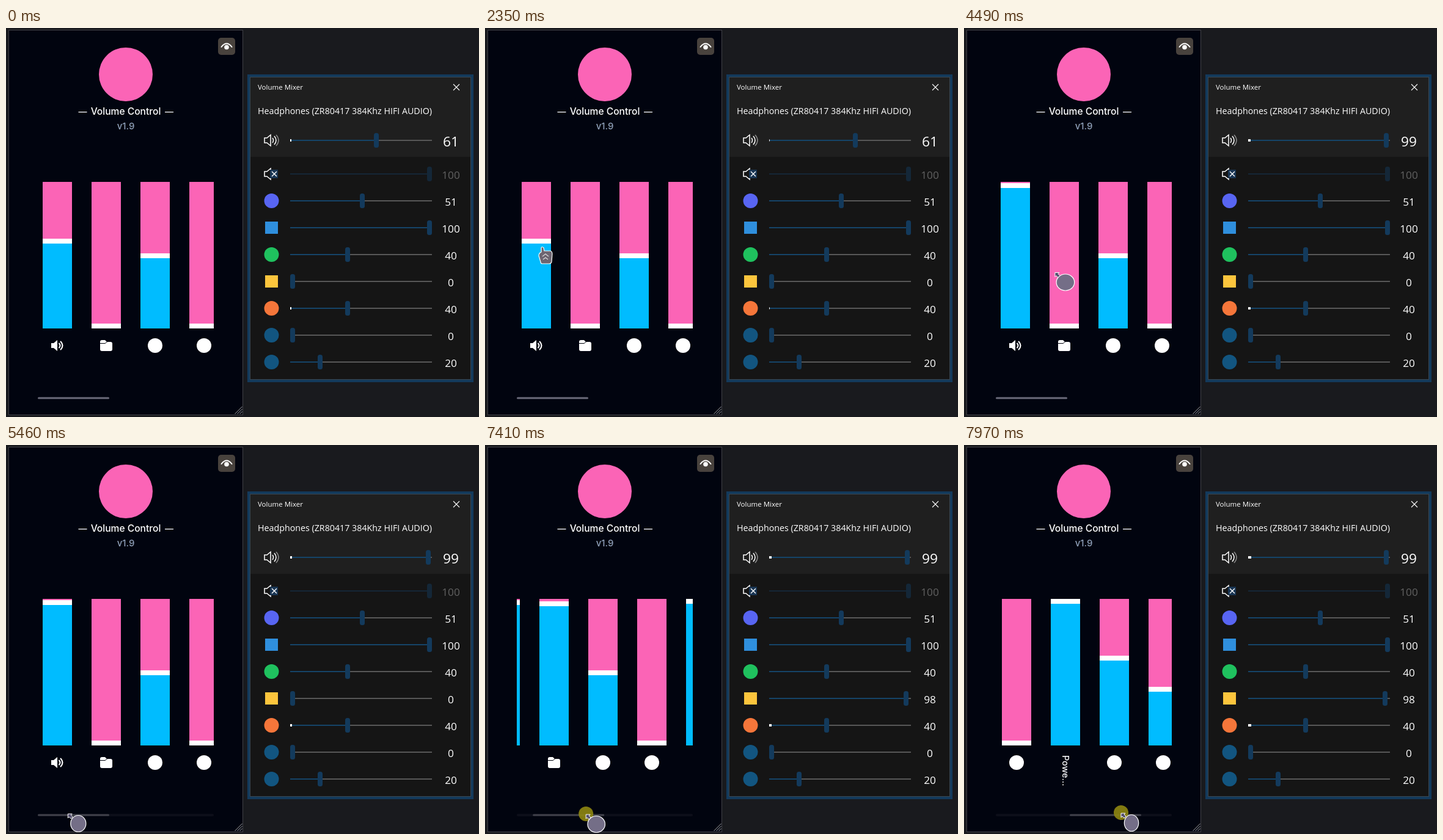
An HTML page that plays this animation: 774 by 637 pixels, repeating every 8000 ms.

```html
<!DOCTYPE html>
<html lang="en">
<head>
<meta charset="utf-8">
<title>Volume Control</title>
<style>
  html, body { margin: 0; width: 100%; height: 100%; overflow: hidden; background: #191a1e; }
  svg { display: block; width: 774px; height: 637px; }
  .app { font-family: Inter, "DejaVu Sans", sans-serif; font-weight: 500; fill: #fff; }
  .mixer { font-family: "Open Sans", "Noto Sans", sans-serif; fill: #fff; }
  .mid { text-anchor: middle; }
</style>
</head>
<body>
<svg viewBox="0 0 774 637" xmlns="http://www.w3.org/2000/svg">
  <defs>
    <clipPath id="view"><rect x="52" y="240" width="288" height="340"/></clipPath>
    <clipPath id="panel"><rect x="5" y="4" width="382" height="633"/></clipPath>
  </defs>
  <rect width="774" height="637" fill="#191a1e"/>

  <rect x="4.500" y="3.500" width="383" height="630" fill="#01040f" stroke="#414146"/>
  <circle cx="196" cy="76" r="44" fill="#fb64b6"/>
  <g class="app mid">
    <text x="125.500" y="142" font-size="14">—</text>
    <text x="196" y="142" font-size="15.600">Volume Control</text>
    <text x="267" y="142" font-size="14">—</text>
    <text x="196" y="166" font-size="15" fill="#90a1b9">v1.9</text>
  </g>
  <rect x="347" y="16" width="28" height="28" rx="5" fill="#48423d"/>
  <path d="M352.500 31q8.500-11 17 0" fill="none" stroke="#fff" stroke-width="2" stroke-linecap="round"/>
  <circle cx="361" cy="31.500" r="3.800" fill="#fff"/>
  <path d="M374.500 632l12-12m-8 12l8-8m-4 8l4-4" stroke="#aaa" fill="none"/>

  <g clip-path="url(#view)"><g id="bars"></g></g>
  <rect id="rail" x="52" y="604" width="288" height="4" rx="2" fill="#0c0e19"/>
  <rect id="grip" y="604.500" width="117" height="3" rx="1.500"/>

  <rect x="397" y="78" width="366" height="500" fill="#151515" stroke="#133a5c" stroke-width="4"/>
  <rect x="399" y="80" width="362" height="131" fill="#1f1f1f"/>
  <rect x="399.500" y="80.500" width="361" height="495" fill="none" stroke="#3a4650"/>
  <path d="M732 92l10 10m0-10l-10 10" stroke="#fff" stroke-width="1.100"/>
  <g class="mixer">
    <text x="412" y="101" font-size="11.500">Volume Mixer</text>
    <text x="412" y="141" font-size="14.260">Headphones (ZR80417 384Khz HIFI AUDIO)</text>
  </g>
  <g id="rows"></g>

  <g clip-path="url(#panel)"><g id="cursor">
    <circle id="press" cy="-1" r="12" fill="#8c8411" fill-opacity=".92"/>
    <g id="pointer">
      <ellipse id="body" cx="17" cy="16" fill="#746e87" stroke="#fff" stroke-width="1.200"/>
      <path d="M0 0h7l-2 2 3 3-3 3-3-3-2 2z" fill="#55506e" stroke="#fff"/>
    </g>
    <g id="hand">
      <path d="M0 2q1-3 4 0l1 5h10q3 1 3 5l-1 13q-1 3-4 3H2q-3 0-3-3l-3-10q0-3 2-5l2-1z" fill="#6e6571" stroke="#fff" stroke-width="1.200"/>
      <path d="M2 16l5-4 5 4M3 21l4-3 4 3" fill="none" stroke="#ddd" stroke-width="1.200"/>
    </g>
  </g></g>
</svg>
<script>
const LOOP = 8000;
const $ = id => document.getElementById(id);
const set = (el, attrs) => { for (const k in attrs) el.setAttribute(k, attrs[k]); };
const show = (el, on) => set(el, { visibility: on ? 'visible' : 'hidden' });
const within = (t, a, b) => t >= a && t < b;

// Linear track through [time, value...] keys.
function track(keys, t, col = 1) {
  if (t <= keys[0][0]) return keys[0][col];
  for (let i = 1; i < keys.length; i++) {
    const a = keys[i - 1], b = keys[i];
    if (t < b[0]) return a[col] + (b[col] - a[col]) * (t - a[0]) / (b[0] - a[0]);
  }
  return keys[keys.length - 1][col];
}

const path = [
  [70, 170, 640], [400, 110, 560], [600, 66, 480], [820, 150, 440], [960, 202, 432],
  [1120, 229, 455], [1300, 172, 530], [1500, 64, 450], [1650, 98, 412], [2000, 100, 370],
  [2350, 92, 358], [2540, 92, 350], [3300, 84, 254], [3450, 80, 260], [4140, 78, 418],
  [4300, 92, 415], [4490, 149, 400], [4900, 120, 604], [5500, 100, 604], [5800, 140, 560],
  [5930, 150, 488], [6150, 146, 258], [6290, 144, 407], [6640, 134, 570], [6900, 139, 605],
  [7410, 165, 605], [7970, 257, 603]
];
const slide = [[6930, 0], [7410, 26], [7970, 121]];
const masterKeys = [[2560, 61], [3300, 100], [4209, 100], [4210, 99]];
const folderKeys = [[5930, 0], [6150, 98]];
const level = [
  [0, 1.5], [300, 2.5], [500, 1], [960, 1], [1300, 2], [1700, 1], [2150, 3], [2350, 1],
  [3000, 2], [4300, 1], [4490, 4], [4700, 1], [5500, 3], [6000, 1], [6290, 1],
  [6900, 8], [7100, 2], [7410, 4], [7700, 2], [7970, 5]
];

// Strips on the left.
const disc = '<circle cx="24" cy="520" r="12" fill="#fff"/>';
const icons = [
  '<path d="M14 516h4l6-5v18l-6-5h-4z" fill="#fff"/><path d="M27 516.500q3 3.500 0 7m2.500-10q6 6.500 0 13" fill="none" stroke="#fff" stroke-width="2" stroke-linecap="round"/>',
  '<path d="M14 514q0-3 3-3h5l3 3h0l-3 2h-8zM14 517h8l4-3h5q3 0 3 3v9q0 3-3 3H17q-3 0-3-3z" fill="#fff"/>',
  disc, disc,
  '<text class="app" transform="translate(19 508) rotate(90)" font-size="14.300">Powe...</text>',
  disc, disc, disc
];
const volumes = [61, 0, 51, 0, 100, 61, 40, 0];
$('bars').innerHTML = icons.map((icon, i) =>
  `<g transform="translate(${60 + 80 * i} 0)">
    <rect y="252" width="48" height="240" fill="#fb64b6"/>
    <rect class="fill" width="48" fill="#00bcff"/>
    <rect class="knob" width="48" height="8" fill="#fff"/>${icon}</g>`).join('');

function setBar(i, v) {
  const g = $('bars').children[i];
  const y = Math.round(Math.min(484, 491.6 - 2.4 * v));
  set(g.querySelector('.knob'), { y });
  set(g.querySelector('.fill'), { y: y + 8, height: 484 - y });
}

// Mixer rows on the right.
const speaker = '<path d="M423 -4h4l6-5v18l-6-5h-4z" fill="none" stroke="#fff" stroke-width="1.500"/>';
const dot = color => `<circle cx="434.500" r="12" fill="${color}"/>`;
const square = color => `<rect x="424" y="-10" width="21" height="20" fill="${color}"/>`;
const rows = [
  [184, 61, speaker + '<path d="M436 -4q3 4 0 8m3-11q6 7 0 14" fill="none" stroke="#fff" stroke-width="1.500"/><path d="M442 -9q8 9 0 18" fill="none" stroke="#888" stroke-width="1.500"/>'],
  [239, 100, speaker + '<rect x="432" y="-7" width="13" height="14" fill="#193553"/><path d="M435 -4l8 8m0-8l-8 8" stroke="#fff" stroke-width="1.400"/>'],
  [283, 51, dot('#5865f2')],
  [327, 100, square('#2f8fdd')],
  [371, 40, dot('#1fc15e')],
  [415, 0, square('#fcc53d')],
  [459, 40, dot('#f5763a')],
  [503, 0, dot('#125580')],
  [547, 20, dot('#125580')]
];
$('rows').innerHTML = rows.map(([y, v, icon], i) => {
  const muted = i === 1;
  return `<g transform="translate(0 ${y})">${icon}
    <rect x="465" y="-1" width="232" height="2" fill="${muted ? '#172634' : '#575757'}"/>
    <rect class="fill" x="465" y="-1" height="2" fill="${muted ? '#152737' : '#154468'}"/>
    <rect class="knob" y="-12" width="8" height="24" rx="3.500" fill="${muted ? '#142738' : '#133a5c'}"/>
    <rect class="meter" x="465" y="-2" height="4" fill="#fff"/>
    <text class="mixer mid" x="728" y="${i ? 7.5 : 10}" font-size="${i ? 17.2 : 22.7}" style="fill:${muted ? '#626262' : '#fff'}">${v}</text></g>`;
}).join('');

function setRow(i, v) {
  const g = $('rows').children[i];
  const x = Math.round(465 + 2.24 * v);
  set(g.querySelector('.fill'), { width: x - 465 });
  set(g.querySelector('.knob'), { x });
  g.querySelector('text').textContent = v;
}

function draw(t) {
  const master = Math.round(track(masterKeys, t));
  const folder = Math.round(track(folderKeys, t));
  setBar(0, master);
  setRow(0, master);
  setBar(1, folder);
  setRow(5, folder);

  const width = Math.round(track(level, t));
  for (const i of [0, 6]) {
    const h = width > 1 ? 4 : 3;
    set($('rows').children[i].querySelector('.meter'), { width, height: h, y: -h / 2 });
  }

  const shift = track(slide, t);
  set($('bars'), { transform: `translate(${-Math.round(shift * 1.967)} 0)` });
  const active = within(t, 4850, 5600) || t >= 6800;
  show($('rail'), active);
  set($('grip'), { x: 52 + shift, fill: active ? '#40414b' : '#6b6b7a' });

  const x = track(path, t), y = track(path, t, 2);
  const hand = within(t, 1680, 4350) || within(t, 5900, 6450);
  set($('cursor'), { transform: `translate(${x.toFixed(1)} ${y.toFixed(1)})` });
  show($('cursor'), t >= 70);
  $('hand').style.display = hand ? '' : 'none';
  $('pointer').style.display = hand ? 'none' : '';
  $('press').style.display = within(t, 2540, 3320) || within(t, 5930, 6170) || t >= 6920 ? '' : 'none';
  set($('body'), { rx: 13 + 1.8 * Math.sin((t - 4300) / 120), ry: 13.5 });
}

volumes.forEach((v, i) => setBar(i, v));
rows.forEach(([, v], i) => setRow(i, v));
const start = performance.now();
function tick() {
  draw((performance.now() - start) % LOOP);
  requestAnimationFrame(tick);
}
draw(0);
requestAnimationFrame(tick);
</script>
</body>
</html>
```
